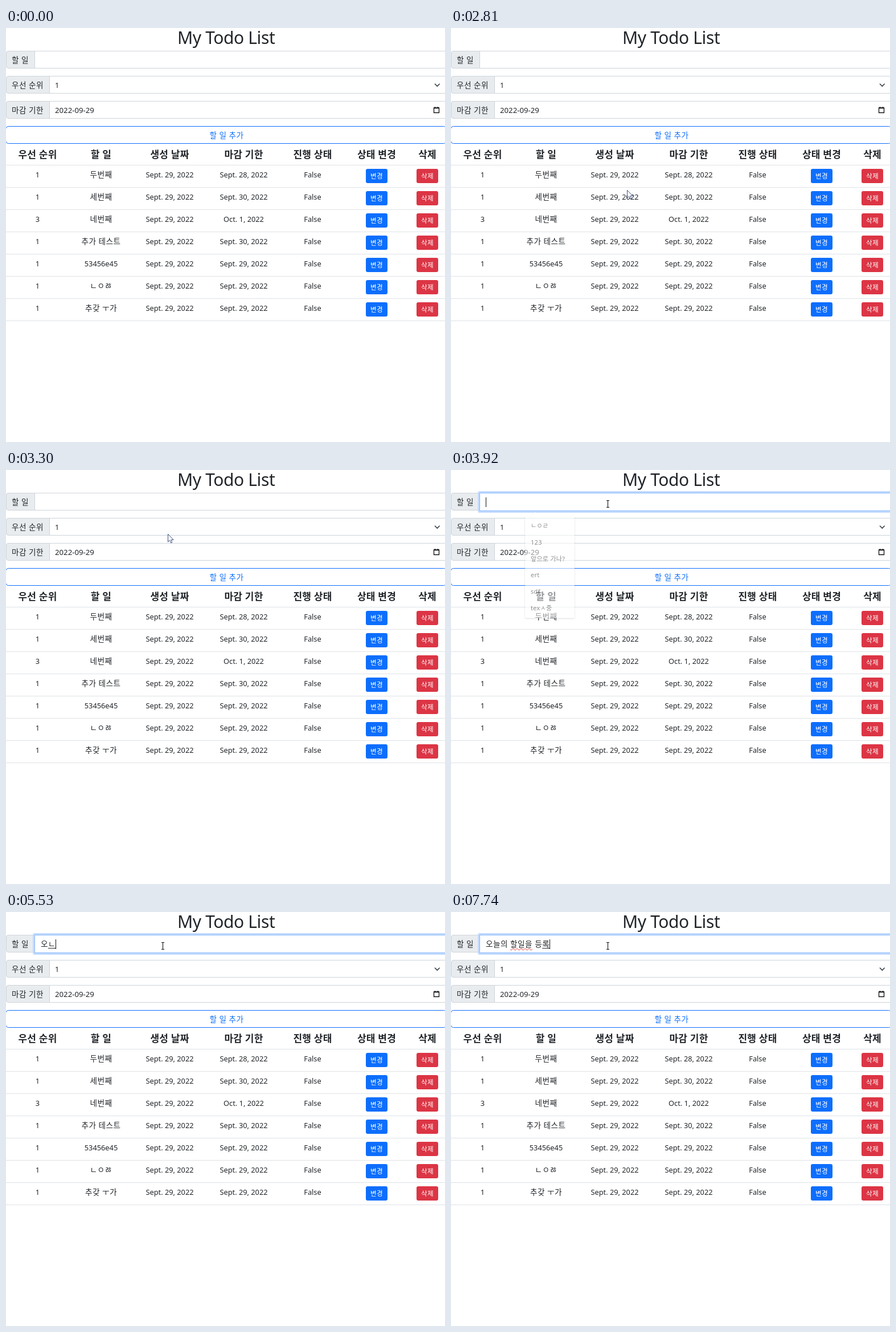
Write an HTML page that moves like this. It is 771 px wide and 726 px high and loops after 8000 ms.

```html
<!DOCTYPE html>
<html lang="ko">
<head>
<meta charset="utf-8">
<title>My Todo List</title>
<style>
  html, body { margin: 0; width: 771px; height: 726px; overflow: hidden; background: #fff; }
  body { position: relative; }
  svg { position: absolute; left: 0; top: 0; display: block; }
  svg, #typed {
    font-family: "Noto Sans", "Noto Sans CJK KR", "Noto Sans CJK JP", "Noto Sans CJK", sans-serif;
    color: #212529; fill: #212529;
  }
  text { white-space: pre; }
  .title { font-size: 30px; font-weight: 300; letter-spacing: -.4px; }
  .ko, #typed { font-size: 13.6px; letter-spacing: .5px; }
  .head { font-size: 17px; font-weight: 700; letter-spacing: .2px; }
  .cell { font-size: 12.8px; }
  .date { font-size: 13.2px; }
  .btn { font-size: 11.6px; letter-spacing: .3px; fill: #fff; }
  .item { font-size: 11px; letter-spacing: .3px; fill: #333; }
  .mid { text-anchor: middle; }
  #typed { position: absolute; left: 61px; top: 46px; line-height: 20px; white-space: pre; }
  #compose { text-decoration: underline 1px; text-underline-offset: 2px; }
  .spell { text-decoration: underline wavy #e33 1px; text-underline-offset: 2px; }
  #caret { display: inline-block; width: 1px; height: 17px; background: #111; vertical-align: -4px; }
</style>
</head>
<body>
<svg width="771" height="726" viewBox="0 0 771 726">
  <defs>
    <filter id="soft" x="-10%" y="-10%" width="120%" height="120%">
      <feDropShadow dx="0" dy="1" stdDeviation="1.2" flood-color="#000" flood-opacity=".3"/>
    </filter>
  </defs>
  <text class="title mid" x="386.7" y="28">My Todo List</text>
  <g id="fields"></g>
  <path d="M753 97.8l4.3 4.3 4.3-4.3" fill="none" stroke="#343a40" stroke-width="1.5"/>
  <path d="M751.5 140h9v8.5h-9zM751 140.6h10M753.5 138v2M758.5 138v2" fill="none" stroke="#111" stroke-width="1.3"/>
  <g id="focus">
    <rect x="48.5" y="38.5" width="740" height="35" rx="2" fill="none" stroke="#c2dbfe" stroke-width="3"/>
    <rect x="50.5" y="40.5" width="740" height="31" fill="#fff" stroke="#86b7fe"/>
  </g>
  <rect id="add" x="-.5" y="172.5" width="774" height="30" rx="5" stroke="#0d6efd"/>
  <text id="addText" class="ko mid" x="387.5" y="192.5">할 일 추가</text>
  <g id="table"></g>
  <g id="tip">
    <rect x="725.5" y="717.5" width="28" height="20" fill="#fff" stroke="#777"/>
    <text class="item mid" x="739.5" y="731">저장</text>
  </g>
  <g id="menu">
    <path d="M132 80.5h9l7-7 7 7h60q2 0 2 2v175q0 2-2 2h-83q-2 0-2-2v-175q0-2 2-2z" fill="#fff" filter="url(#soft)"/>
  </g>
  <path id="arrow" d="M.5.5v13.6l3.1-2.9 2.1 4.6 2.1-.9-2-4.5h4.3z" fill="#fff" stroke="#3c4f80"/>
  <path id="beam" d="M-2.5-6h2l.5.5.5-.5h2M0-5.5v11M-2.5 6h2l.5-.5.5.5h2" fill="none" stroke="#111" stroke-width="1.1"/>
</svg>
<div id="typed"><span id="done"></span><span id="compose"></span><span id="caret"></span></div>

<script>
const $ = id => document.getElementById(id);
const LOOP = 8000;
const FRAME = 70.5, FRAME_ORIGIN = 2030;

function draw(parent, tag, attrs, text) {
  const el = document.createElementNS("http://www.w3.org/2000/svg", tag);
  for (const k in attrs) el.setAttribute(k, attrs[k]);
  if (text) el.textContent = text;
  parent.appendChild(el);
}

const label = (parent, cls, x, y, text) => draw(parent, "text", { class: cls, x, y }, text);

function field(index, name, width, value, cls) {
  const g = $("fields"), y = 40 + index * 44;
  draw(g, "rect", { x: .5, y: y + .5, width: 780, height: 30, rx: 4.5, fill: "#fff", stroke: "#ced4da" });
  draw(g, "path", {
    d: `M${width + .5} ${y + .5}H5q-4.5 0-4.5 4.5v21q0 4.5 4.5 4.5H${width + .5}z`,
    fill: "#e9ecef", stroke: "#ced4da"
  });
  label(g, "ko", 10, y + 21, name);
  label(g, cls, width + 10, y + 20.5, value);
}
field(0, "할 일", 50, "", "cell");
field(1, "우선 순위", 76, "1", "cell");
field(2, "마감 기한", 76, "2022-09-29", "date");

const columns = [55.5, 167, 287.5, 417.5, 538.5, 651, 740];
const headings = ["우선 순위", "할 일", "생성 날짜", "마감 기한", "진행 상태", "상태 변경", "삭제"];
const rows = [
  [1, "두번째", "Sept. 28"],
  [1, "세번째", "Sept. 30"],
  [3, "네번째", "Oct. 1"],
  [1, "추가 테스트", "Sept. 30"],
  [1, "53456e45", "Sept. 29"],
  [1, "ㄴㅇㅀ", "Sept. 29"],
  [1, "추갖 ㅜ가", "Sept. 29"]
];

const table = $("table");
const rule = y => draw(table, "rect", { x: 0, y, width: 771, height: 1, fill: "#dee2e6" });
function button(x, y, color, text) {
  draw(table, "rect", { x: x - 19, y, width: 38, height: 25, rx: 3.2, fill: color });
  label(table, "btn mid", x, y + 17, text);
}

headings.forEach((h, i) => label(table, "head mid", columns[i], 227.5, h));
rule(240);
rows.forEach(([rank, name, due], i) => {
  const y = 262 + i * 39;
  const nameClass = /^\d/.test(name) ? "cell" : "ko";
  const cells = [rank, name, "Sept. 29, 2022", due + ", 2022", "False"];
  cells.forEach((s, c) => label(table, (c === 1 ? nameClass : "cell") + " mid", columns[c], y, s));
  button(columns[5], y - 15, "#0d6efd", "변경");
  button(columns[6], y - 15, "#dc3545", "삭제");
  rule(y + 17);
});

["ㄴㅇㄹ", "123", "앞으로 가나?", "ert", "sdf", "texㅅ중"]
  .forEach((s, i) => label($("menu"), "item", 140, 102 + i * 28.8, s));

// Splits a syllable into the stages seen while it is typed.
const LEADS = "ㄱㄲㄴㄷㄸㄹㅁㅂㅃㅅㅆㅇㅈㅉㅊㅋㅌㅍㅎ";
function stages(ch) {
  const n = ch.charCodeAt(0) - 0xAC00;
  if (n < 0) return [ch];
  const tail = n % 28;
  const list = [LEADS[Math.floor(n / 588)], String.fromCharCode(0xAC00 + n - tail)];
  return tail ? [...list, ch] : list;
}

const typing = [{ time: 0, done: "", compose: "" }];
let before = "";
function type(start, end, text) {
  const keys = [];
  for (const ch of text) {
    for (const s of stages(ch)) {
      keys.push(s === " " ? { done: before + s, compose: "" } : { done: before, compose: s });
    }
    before += ch;
  }
  const gap = (end - start) / Math.max(1, keys.length - 1);
  keys.forEach((key, i) => typing.push({ time: start + i * gap, ...key }));
}
type(4860, 5140, "오");
type(5400, 6140, "늘의 ");
type(6370, 7210, "할일을 ");
type(7340, 7740, "등록");

const ramp = (t, a, b) => Math.min(1, Math.max(0, (t - a) / (b - a)));
const fade = (t, inA, inB, outA, outB) => Math.min(ramp(t, inA, inB), 1 - ramp(t, outA, outB));

const linear = u => u;
const easeOut = u => 1 - (1 - u) ** 2;
const smooth = u => u * u * (3 - 2 * u);

// Each key: time, position, easing used to arrive there.
const mousePath = [
  { time: 2080, x: 724, y: 728 },
  { time: 2810, x: 309, y: 284, ease: smooth },
  { time: 2880, x: 309, y: 281, ease: linear },
  { time: 3158, x: 297, y: 163, ease: linear },
  { time: 3299, x: 284, y: 112, ease: linear },
  { time: 3640, x: 275.5, y: 59.5, ease: easeOut }
];

function mouseAt(t) {
  const last = mousePath.length - 1;
  const i = Math.max(1, Math.min(last, mousePath.findIndex(k => k.time > t) + 1 ? mousePath.findIndex(k => k.time > t) : last));
  const a = mousePath[i - 1], b = mousePath[i];
  const u = b.ease(ramp(t, a.time, b.time));
  return [a.x + (b.x - a.x) * u, a.y + (b.y - a.y) * u];
}

const WHITE = [255, 255, 255], BLUE = [13, 110, 253];
const mix = (a, b, k) => `rgb(${a.map((v, i) => Math.round(v + (b[i] - v) * k))})`;

let shown = null;
function showTyped(t) {
  const state = typing.filter(s => s.time <= t).pop();
  if (state === shown) return;
  shown = state;
  $("done").innerHTML = state.done.replace("할일을 ", '<span class="spell">할일을</span> ');
  $("compose").textContent = state.compose;
}

function render(t) {
  const held = FRAME_ORIGIN + Math.floor((t - FRAME_ORIGIN) / FRAME) * FRAME;

  $("tip").style.opacity = fade(held, 1060, 1170, 2050, 2170);
  $("focus").style.opacity = ramp(held, 3670, 3850);
  $("menu").style.opacity = fade(held, 3750, 3960, 4840, 5140);
  $("caret").style.opacity = (t >= 3710 && t < 4380) || t >= 4860 ? 1 : 0;

  const hover = fade(held, 2990, 3090, 3100, 3200);
  $("add").style.fill = mix(WHITE, BLUE, hover);
  $("addText").style.fill = mix(BLUE, WHITE, hover);

  const [x, y] = mouseAt(held);
  const overText = y < 72;
  $("arrow").style.display = overText ? "none" : "";
  $("beam").style.display = overText ? "" : "none";
  $(overText ? "beam" : "arrow").setAttribute("transform", `translate(${x} ${y})`);

  showTyped(t);
}

function tick() {
  render(performance.now() % LOOP);
  requestAnimationFrame(tick);
}
tick();
</script>
</body>
</html>
```
